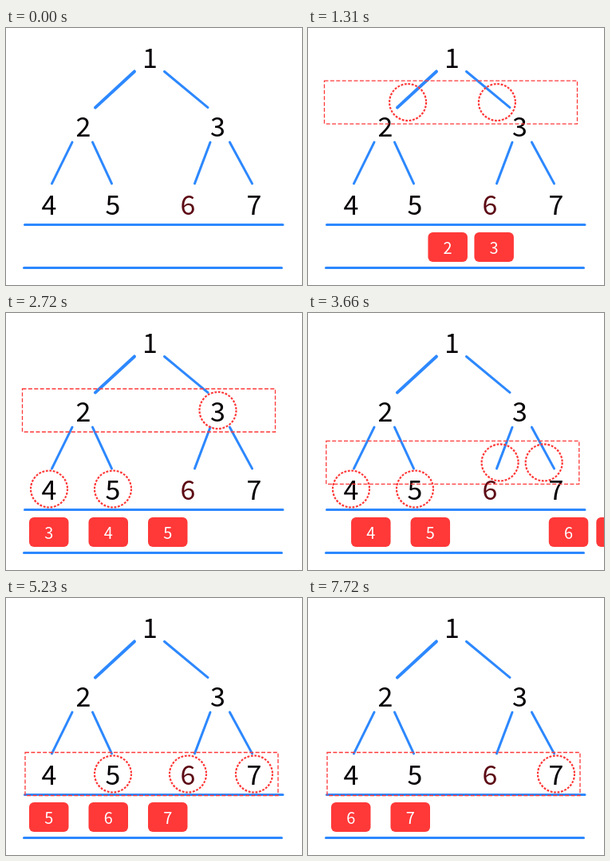
Animation, 371 px wide and 322 px high, one loop 8.19 s. Source, as an HTML page:

```html
<!DOCTYPE html>
<html lang="en">
<head>
<meta charset="utf-8">
<title>Level-order traversal with a queue</title>
<style>
html, body { margin: 0; width: 100%; height: 100%; overflow: hidden; background: #fff; }
svg { display: block; width: 371px; height: 322px; overflow: hidden; }
text { font-family: "Noto Sans CJK SC", "Noto Sans CJK JP", "Noto Sans CJK", "Noto Sans", sans-serif; text-anchor: middle; }
.node { font-size: 34px; }
.line { stroke: #2d88ff; stroke-linecap: round; }
.tile rect { fill: #ff3838; }
.tile text { fill: #fff; font-size: 20px; }
.ring { fill: none; stroke: #ff3838; stroke-width: 2.2; stroke-dasharray: 2.8 1.7; }
.level { fill: none; stroke: #ff3838; stroke-width: 1.3; stroke-dasharray: 5 2.4; }
</style>
</head>
<body>
<svg id="stage" viewBox="0 0 371 322"></svg>
<script>
const LOOP = 8190, MOVE = 550, LAST_SHIFT = 6;
const starts = [210, 1080, 2143, 3430, 4680, 5920, 7170];   // one per traversal step

const levels = [{ y: 36, left: 20.5 }, { y: 122, left: 20.5 }, { y: 220.5, left: 24 }];
const above = { x: 181, y: -36, left: 20.5 };

// Heap order: the parent of node n is n >> 1. edge: x of both line ends, entry: where its tile comes from
const nodes = [
  above,
  { x: 180.5, entry: 388 },
  { x: 97, entry: 390, edge: [161, 112], width: 4 },
  { x: 265.5, entry: 444, edge: [198.5, 253] },
  { x: 54, entry: 398, edge: [83, 57.5] },
  { x: 134, entry: 461, edge: [108.5, 132.5] },
  { x: 228, entry: 546, edge: [256, 236.5], ink: "#5c0a14" },
  { x: 311, entry: 576, edge: [280.5, 308.5] }
];
nodes.slice(1).forEach((node, i) => {
  node.id = i + 1;
  node.parent = nodes[node.id >> 1];
  node.born = (node.id >> 1) + 1;      // step that puts it in the queue
  node.y = levels[depth(node.id)].y;
});
const tree = nodes.slice(1);

const stage = document.getElementById("stage");

function depth(n) { return Math.floor(Math.log2(n)); }

function add(parent, tag, attrs, content = "") {
  const el = document.createElementNS("http://www.w3.org/2000/svg", tag);
  for (const key in attrs) el.setAttribute(key, attrs[key]);
  el.textContent = content;
  return parent.appendChild(el);
}

function addLine(x1, y1, x2, y2, width = 3) {
  add(stage, "line", { class: "line", x1, y1, x2, y2, "stroke-width": width });
}

const place = (el, x, y) => el.setAttribute("transform", `translate(${x} ${y})`);

function eased(step, t) {
  const u = Math.min(1, Math.max(0, (t - starts[step - 1]) / MOVE));
  return 1 - (1 - u) ** 2;
}

// Blend a value that is known at rest after every step
function blend(valueAt, t) {
  let value = valueAt(0);
  for (let s = 1; s <= starts.length; s++)
    value += (valueAt(s) - valueAt(s - 1)) * eased(s, t);
  return value;
}

// After step s node s is at the front of the queue
function slot(node, step) {
  const s = Math.min(step, LAST_SHIFT);
  if (s < node.born) return node.entry;
  if (s > node.id) return -120;
  return 29 + (node.id - s) * Math.min(74.5, 30 * s);
}

const levelAt = step => step ? levels[depth(step)] : above;

for (const { y, edge, parent, width } of tree) {
  if (!edge) continue;
  const drop = y - parent.y;
  addLine(edge[0], parent.y + drop * 0.215, edge[1], parent.y + drop * 0.74, width);
}
addLine(23.5, 246.5, 347, 246.5);
addLine(22.5, 300.5, 345.5, 300.5);

for (const { x, y, id, ink = "#050005" } of tree)
  add(stage, "text", { class: "node", x, y: y + 13.5, fill: ink }, id);

for (const node of tree) {
  node.tile = add(stage, "g", { class: "tile" });
  add(node.tile, "rect", { width: 49.5, height: 37, rx: 6 });
  add(node.tile, "text", { x: 24.7, y: 27 }, node.id);
}
for (const node of tree) node.ring = add(stage, "circle", { class: "ring", r: 23 });
const box = add(stage, "rect", { class: "level", width: 317, height: 54 });

// A ring splits into its children's rings, or fades at a leaf
function ringOpacity({ id, born }, t) {
  if (t < starts[born - 1] || id >= starts.length) return t < starts[born - 1] ? 0 : 1;
  return nodes[2 * id] ? Number(t < starts[id]) : 1 - eased(id + 1, t);
}

function draw(t) {
  for (const node of tree) {
    const spot = step => step < node.born ? node.parent : node;
    place(node.tile, blend(s => slot(node, s), t), 256);
    place(node.ring, blend(s => spot(s).x, t), blend(s => spot(s).y, t));
    node.ring.setAttribute("opacity", ringOpacity(node, t));
  }
  place(box, blend(s => levelAt(s).left, t), blend(s => levelAt(s).y, t) - 27);
}

const begin = performance.now();
function tick() {
  draw((performance.now() - begin) % LOOP);
  requestAnimationFrame(tick);
}
tick();
</script>
</body>
</html>
```
